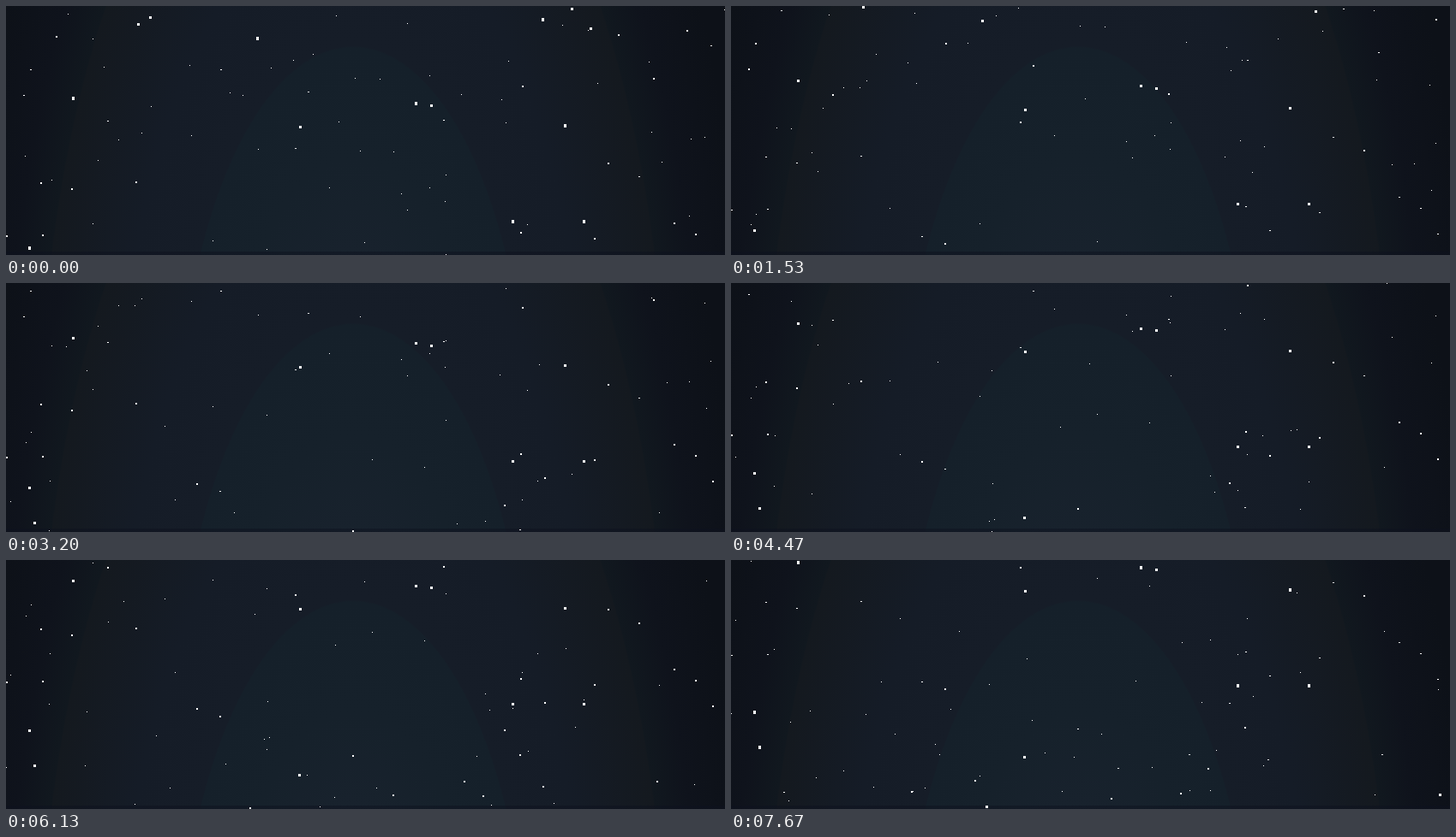
Animation of 839x291 px, one loop 7.74 s. Source, as an HTML page with a canvas:

```html
<!DOCTYPE html>
<html lang="en">
<head>
<meta charset="utf-8">
<title>Starfield</title>
<style>
  html, body { margin: 0; width: 100%; height: 100%; overflow: hidden; }
  body {
    background:
      linear-gradient(rgba(13, 17, 30, .5), rgba(13, 17, 30, .5)) 0 287px / 100% 4px no-repeat,
      radial-gradient(464px 1080px at 405px 524px,
        #18222d 21.6%, #16212b 32%, #15202a 44%,
        #161d28 44.2%, #151c27 59%, #14191f 78.7%,
        #11181f 79%, #0f131c 87%, #0d1118 100%);
  }
  canvas { display: block; }
</style>
</head>
<body>
<canvas id="sky" width="839" height="291"></canvas>
<script>
const LOOP = 7740;
const FPS = 15;
const sky = document.getElementById('sky');
const ctx = sky.getContext('2d');

// The brighter stars: x, y pairs at the start of the loop.
const medium = [
  58,35.5, 28,74, 20.5,104, 118,134, 40.5,206.5, 76.5,213.5,
  151.5,205.5, 250,74, 337,166, 352.5,100, 510.5,133, 602.5,93.5, 714.5,33.5,
  794.5,28.5, 755.5,84.5, 702,183.5, 738.5,199, 779.5,253.5, 804.5,266.5,
  686.5,271.5, 600.5,264.5, 42.5,267.5, .5,268.5, 822,46, 222.5,299.5,
  249,308, 581,324.5, 628.5,292.5, 824,296.5, 599.5,353, 404,354.5,
  534.5,384.5, 626.5,390.5, 556,401, 451.5,400.5, 759,384.5, 284.5,415
];
const big = [
  153.5,21, 168,13, 78,107.5, 293,37.5, 342.5,141, 478,113.5, 495.5,116,
  626,15.5, 681.5,26, 652,139.5, 591,251.5, 673.5,251.5, 27,282.5, 660,3,
  32.5,323.5, 341.5,335, 298,393, 826.5,379
];

// The faint stars form an even random field.
let seed = 29;
const random = () => (seed = seed * 16807 % 2147483647) / 2147483647;

function scatter(count, top, bottom) {
  const stars = [];
  for (let i = 0; i < count; i++) {
    stars.push(Math.floor(random() * sky.width), top + random() * (bottom - top));
  }
  return stars;
}

const layers = [
  { stars: scatter(137, 0, 606), width: 1, height: .78, speed: 2.762 },
  { stars: medium.concat(scatter(4, 425, 440)), width: 2, height: 1.7, speed: 1.381 },
  { stars: big, width: 3, height: 3.2, speed: .921 }
];

// Rows snap to whole pixels, so thin stars twinkle as they rise.
function drawLayer({ stars, width, height, speed }, steps) {
  for (let i = 0; i < stars.length; i += 2) {
    const y = stars[i + 1] - steps * speed;
    const top = Math.ceil(y - height / 2);
    const rows = Math.floor(y + height / 2) - top + 1;
    const left = Math.round(stars[i] - (width - 1) / 2);
    if (rows > 0) ctx.fillRect(left, top, width, rows);
  }
}

function draw(time) {
  const frame = Math.floor((time % LOOP + 5) * FPS / 1000);
  const steps = Math.max(frame * .4, frame - 1);
  ctx.clearRect(0, 0, sky.width, sky.height);
  ctx.fillStyle = '#fff';
  layers.forEach(layer => drawLayer(layer, steps));
}

const start = performance.now();
function tick() {
  draw(performance.now() - start);
  requestAnimationFrame(tick);
}
tick();
</script>
</body>
</html>
```
